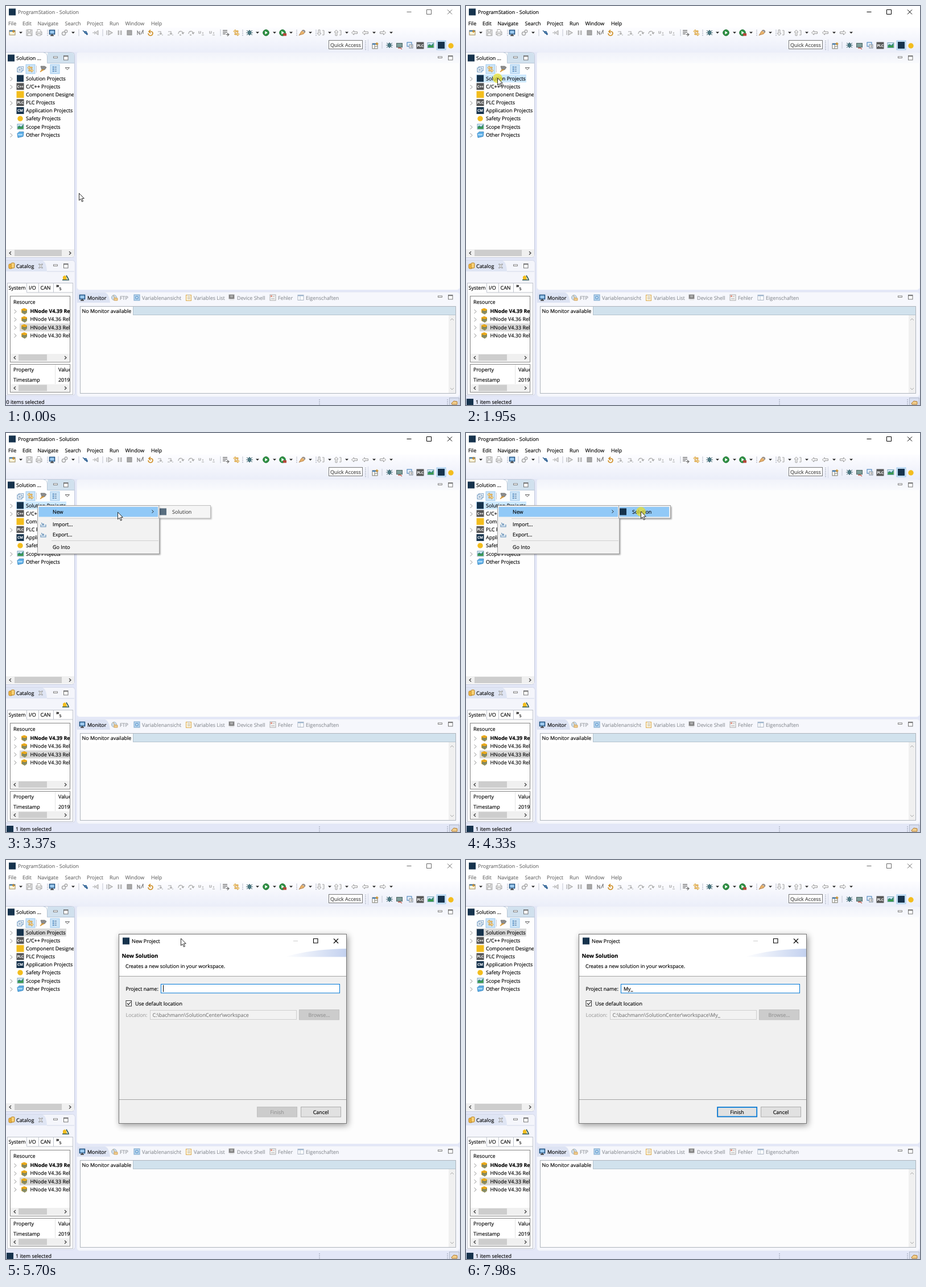
Animation, 798 px wide and 702 px high, one loop 8 s. Source, as an HTML page:

```html
<!DOCTYPE html>
<html lang="en">
<head>
<meta charset="utf-8">
<title>New solution</title>
<style>
html, body { margin: 0; width: 100%; height: 100%; overflow: hidden; background: #e3e7f7; }
svg { display: block; width: 798px; height: 702px; }
text { font: 8.95px "Open Sans", "Noto Sans", sans-serif; text-rendering: geometricPrecision; white-space: pre; stroke-width: .16px; }
</style>
</head>
<body>
<svg id="stage" viewBox="0 0 798 702" xmlns="http://www.w3.org/2000/svg"></svg>
<script>
const NAVY = '#16334d', GOLD = '#f3bd1d', GREY = '#a9a9a9', BLUE = '#3a78b5', ORANGE = '#d08f26', INK = '#000';
const stage = document.getElementById('stage');

// ---- drawing helpers: y of a text is its middle line ----
const rect = (x, y, w, h, fill, stroke = 'none', more = '') =>
  `<rect x="${x}" y="${y}" width="${w}" height="${h}" fill="${fill}" stroke="${stroke}" ${more}/>`;
const path = (d, stroke, fill = 'none', width = 1, more = '') =>
  `<path d="${d}" stroke="${stroke}" fill="${fill}" stroke-width="${width}" ${more}/>`;
const text = (x, y, s, fill = INK, style = '', more = '') =>
  `<text x="${x}" y="${y + 3.2}" fill="${fill}" stroke="${fill}" style="${style}" ${more}>${s}</text>`;
const mid = (x, y, s, fill, style) => text(x, y, s, fill, style, 'text-anchor="middle"');
const group = (id, body) => `<g id="${id}">${body}</g>`;
const at = (x, y, body) => `<g transform="translate(${x} ${y})">${body}</g>`;
const tile = (x, y, label, fill) =>
  rect(x - 6.5, y - 6, 13, 12, fill) + (label ? mid(x, y - 1, label, '#fff', 'font-size:6.2px;font-weight:700') : '');
const logo = (x, y) => rect(x - 6, y - 6, 12, 12, NAVY);
const drop = x => path(`M${x - 3} 45.5h6l-3 3z`, 'none', '#222');
const dots = (x, y, h = 12) => path(`M${x} ${y}v${h}`, '#8f95a8', 'none', 1.3, 'stroke-dasharray="1.3 1.7"');
const bar = (x, y) => path(`M${x} ${y}v12`, '#c3c6d2');
const minMax = (x, y) => rect(x + .5, y - 2, 7, 2.5, '#fff', '#666', 'stroke-width=".8"') +
  rect(x + 18.5, y - 3.5, 7.5, 7.5, '#fff', '#666', 'stroke-width=".9"') + path(`M${x + 18.5} ${y - 2.3}h7.5`, '#666');
const chevron = (x, y) => path(`M${x - 2} ${y - 3}l3.5 3.5l-3.5 3.5`, '#8c8c8c');
const scrollbar = (x, y, w, from, to) => rect(x, y, w, 13, '#f0f0f0') + rect(from, y + 1, to - from, 11, '#cdcdcd') +
  path(`M${x + 9} ${y + 4}l-3 2.7l3 2.7M${x + w - 9} ${y + 4}l3 2.7l-3 2.7`, '#444', 'none', 1.3);

// ---- icons, drawn around 0,0 ----
const icons = {
  window: rect(-5, -4, 10, 8, '#fdf6dc', '#9b8b5c') + path('M-5-3h10', BLUE, 'none', 2) + path('M2-5v5M0-2h5', ORANGE, 'none', 1.5),
  perspective: rect(-5, -4, 9, 9, '#fff', '#7d7a6a') + path('M-5-3h9', BLUE, 'none', 2) + path('M-1-2v7M-1 1h5', '#7d7a6a') + path('M3-6v5M.5-3.5h5', ORANGE, 'none', 1.5),
  save: rect(-5, -5, 10, 10, '#e4e4e4', GREY) + rect(-2.5, -5, 5, 3.5, '#fff', GREY) + rect(-3, 1, 6, 4, '#fff', GREY),
  print: rect(-5, -1.5, 10, 5, '#ddd', GREY) + path('M-3-1.5v-4h5l1 1v3M-3 2h6v3h-6z', GREY, '#fff'),
  screen: rect(-4.5, -4.5, 9, 7, '#9cc9ee', '#1c4f80', 'stroke-width="1.5"') + path('M-3 5h6M0 2v3', '#333', 'none', 1.5),
  gears: '<circle cx="-1.5" cy="1.5" r="3" fill="none" stroke="#aaa" stroke-width="1.6"/><circle cx="2.5" cy="-2.5" r="2.3" fill="none" stroke="#aaa" stroke-width="1.4"/>',
  pin: path('M-4-4L4 4M-2-2l4 0l2 4l-4-1z', '#2d5f91', '#79a9d4', 1.3),
  back: path('M5-4v8l-5-4zM-1-3v6M-5 0h4', GREY, '#ddd'),
  resume: path('M-5-4v8M-2-4v8l7-4z', GREY, '#e2e2e2', 1.2),
  pause: path('M-2.2-4v8M2.2-4v8', '#b5b5b5', 'none', 2.6),
  stop: rect(-4, -4, 8, 8, '#a9a9a9', '#888'),
  link: path('M-5 4v-7l4 6v-6M1 3l4-8v7', '#777', 'none', 1.1),
  sync: path('M-4 1a4 4 0 0 0 8 0a3 3 0 0 0-3-3h-3M0-5l-3 3l3 3', ORANGE, 'none', 1.7),
  into: path('M-4-2h5v4M-1 1l2 2l2-2M-5 4h4M3 4h2', '#aaa', 'none', 1.2),
  over: path('M-4 2a4 4 0 0 1 8-1M2 0l2 2l2-3M-2 4h3', '#aaa', 'none', 1.3),
  out: path('M-4-3v4h3M-1-3l0 4M1 4h4M3-1v3', '#aaa', 'none', 1.2),
  lines: path('M-5-4h8M-5-1h8M-5 2h5M1 3h5M3 1l3 2l-3 3', '#777', 'none', 1.3),
  swap: path('M-5-2.5l3-3v2h5v2h-5v2zM5 2.5l-3 3v-2h-5v-2h5v-2z', ORANGE, '#fbe3a6', .9),
  bug: '<ellipse rx="2.7" ry="3.5" fill="#6a9aa4" stroke="#37606b"/>' + path('M-5-4l3 2M5-4l-3 2M-6 0h12M-5 4l3-2M5 4l-3-2M0-5v10', '#37606b'),
  run: '<circle r="5.3" fill="#2f9244" stroke="#1d7232"/>' + path('M-1.7-3v6l4.6-3z', 'none', '#fff'),
  brush: path('M-5 5l4-7l4-3l3 3l-3 4l-7 2z', '#b9824a', '#e9b46d') + path('M0-4h5v4', '#777', '#b8bcc6'),
  broom: path('M-5-5h7l3 2l-3 4h-5z', '#777', '#8e8e8e') + path('M-3 1l-3 4l7-4z', ORANGE, '#e9b46d'),
  load: path('M-5-5h3v6h2l-3.5 4l-3.5-4h2zM2-4h3v8h-3', '#a5a5a5', '#f1f1f1'),
  unload: path('M-5 5h3v-6h2l-3.5-4l-3.5 4h2zM2-4h3v8h-3', '#a5a5a5', '#f1f1f1'),
  left: path('M-5.5 0l4-4v2.4h6v3.2h-6v2.4z', '#999', '#f6f6f6'),
  right: path('M5.5 0l-4-4v2.4h-6v3.2h6v2.4z', '#999', '#f6f6f6'),
  chart: rect(-5, -4.5, 11, 9, '#d6eaf8', '#7fa6bd') + path('M-4.5 4v-4l3-2l3 2l4-4v8z', 'none', '#3a9a4b') + path('M-4 1l3-2l3 2l3-4', BLUE),
  folder: path('M-5-2l3-3h8l-1 8l-9 2z', '#3d8ac4', '#62b1e8') + path('M-4 0h8', '#d4efff', 'none', 1.5),
  list: path('M-1-3.5h4M-1 0h4M-1 3.5h4', '#4d6f96', 'none', 1.2) + path('M-4-3.5h2M-4 0h2M-4 3.5h2', BLUE, 'none', 2),
  collapse: rect(-2.5, -4.5, 8, 7, '#fff', '#86a6c7') + rect(-5, -2, 8, 7, '#fff', '#5586b5') + path('M-3 1.5h4', '#2d5f91', 'none', 1.2),
  books: path('M-5-3.5l5-2l5 2v6l-4 3l-6-3z', 'none', '#e9a91c') + path('M-4-1.5l5 2l4-2v4l-4 3l-5-2.5z', 'none', '#35617a') +
    path('M-4 0l5 2.2l4-2M-4 2.3l5 2l4-2.3', '#f0c650', 'none', .9),
  jars: rect(-5, -3, 6, 8, '#f1b844', '#b57b16', 'rx="1.5"') + rect(-1, -5, 6, 9, '#f8d278', '#b57b16', 'rx="1.5"'),
  globe: '<circle cx="-1" r="4.5" fill="#cfdde9" stroke="#9db3c6"/>' + path('M-1 1h6v4h-6zM-3-4l4 5', '#d1a155', '#f2cf93'),
  vars: rect(-5, -5, 10, 10, '#b6d4ee', '#7ba5cb') + '<circle r="2.7" fill="#4d8dc6"/>' + path('M-1-1h2v2h-2z', '#fff'),
  clip: rect(-4.5, -4.5, 9, 10, '#fff4d8', '#dbab53') + path('M-2-4.5h4M-2-1h5M-2 2h5', '#a6a6a6', 'none', 1.2),
  shell: rect(-5, -5, 9, 7, '#777', '#999') + path('M-3-3h5M-3-1h5M-4 4h8', '#ddd'),
  error: rect(-5, -5, 10, 10, '#f5f5f5', '#aaa') + path('M-3 2h6M0-2h3', '#aaa') + rect(-4, -4, 3, 3, '#e59a8b'),
  table: rect(-5, -4.5, 10, 9, '#fff', '#a9b4c2') + path('M-5-3.5h10', '#9db6d1', 'none', 2) + path('M-1-3v7', '#b9c4d1'),
  pages: rect(-5, -5, 8, 7, '#e6f0fa', BLUE) + rect(-1, -1, 6, 6, '#fff', '#7b8796') + path('M1 1h3M1 3h3', '#777'),
  debug: rect(-5.5, -4.5, 10, 7, '#7d9e9a', '#4f6462') + path('M0 3l4 3M-3 4h4', '#c25a4a', 'none', 1.5),
  tray: path('M-5 0v4h9v-4M-4-3l4 4M0-2v3h-3', '#6c95bb', '#d9e5f0', 1.2)
};
const icon = (name, x, y = 47) => at(x, y, icons[name]);
const safety = (x, y) => `<circle cx="${x}" cy="${y}" r="4.7" fill="${GOLD}"/>`;

// ---- fixed parts of the window ----
const lit = (x, y) => rect(x - 8, y - 8, 16, 16, '#cce4f7', '#90c0ea', 'stroke-width=".8"');

function topBars() {
  const words = [['File', 4], ['Edit', 29], ['Navigate', 55.5], ['Search', 103.5], ['Project', 142], ['Run', 182], ['Window', 209.5], ['Help', 255]];
  const tools = [['window', 11], ['save', 41], ['print', 58], ['screen', 81], ['gears', 103], ['pin', 139], ['back', 157], ['resume', 182],
    ['pause', 200], ['stop', 217], ['link', 236], ['sync', 254], ['into', 271], ['into', 289], ['over', 307], ['over', 325], ['out', 343],
    ['out', 362], ['lines', 386], ['swap', 405], ['bug', 428], ['run', 457], ['run', 486], ['brush', 520], ['load', 554], ['unload', 584],
    ['left', 613], ['left', 632], ['right', 662]];
  return rect(0, 0, 798, 702, '#e3e7f7') + rect(0, 0, 798, 38, '#fff') + rect(0, 38, 798, 43, 'url(#tools)') + logo(11, 10.5) +
    group('caption', text(21, 10.7, 'ProgramStation - Solution') + words.map(([w, x]) => text(x, 30.7, w)).join('') +
      path('M704.5 10.5h8M739.5 6.5h8v8h-8zM776 6.5l8 8m0-8l-8 8', INK)) +
    tools.map(([n, x]) => icon(n, x)).join('') + rect(487, 48, 6, 4.5, '#b4473a') +
    [26, 118, 442, 472, 501, 535, 569, 599, 647, 677].map(drop).join('') +
    [73, 416, 511, 545].map(x => dots(x, 42)).join('') + [92, 128, 170, 377].map(x => bar(x, 41)).join('') +
    rect(567.5, 60.5, 59, 15, '#fff', '#777') + text(570, 68.5, 'Quick Access', '#444') + dots(632, 61, 17) + path('M636.5 59v20', '#d5d9e8') + bar(661, 63) +
    icon('perspective', 649, 70) + icon('bug', 674, 69) + icon('debug', 692, 70) + icon('pages', 710, 69) + tile(728, 69.5, 'PLC', '#575757') +
    icon('chart', 746, 69) + lit(765, 69) + logo(765, 69) + safety(782, 70);
}

const editor = () => rect(124.5, 81.5, 673, 418, '#fdfdfd', '#eceef8', 'rx="5"') + rect(125, 82, 673, 18.5, 'url(#head)') + minMax(759, 91);

const rowY = i => 127.4 + i * 14.15;
const rows = [
  ['Solution Projects', logo, 1], ['C/C++ Projects', (x, y) => tile(x, y, 'C++', '#575757'), 1],
  ['Component Designer', (x, y) => tile(x, y, '', GOLD)], ['PLC Projects', (x, y) => tile(x, y, 'PLC', '#575757'), 1],
  ['Application Projects', (x, y) => tile(x, y, 'CM', NAVY)], ['Safety Projects', safety],
  ['Scope Projects', (x, y) => icon('chart', x, y), 1], ['Other Projects', (x, y) => icon('folder', x, y), 1]
];
const rowEnds = [106, 101, 119, 88, 119, 97, 97, 96];

function projects() {
  const list = rows.map(([name, mark, nested], i) => {
    const y = rowY(i);
    return (nested ? chevron(9.5, y + .5) : '') + mark(25, y) + text(35, y, name);
  }).join('');
  return rect(-4, 81.5, 124.5, 361, '#fefefe', '#c5cbdc', 'rx="5"') + path('M73 82H115q5 0 5 5v13.5H73z', 'none', '#d1e1ee') +
    path('M66 82q6 0 6.5 7v11.5H120', '#b7c7d8') + logo(9, 91.5) + text(18, 91.7, 'Solution ...') + minMax(83, 91) +
    icon('collapse', 25, 111) + lit(43, 111) + icon('swap', 43, 111) + bar(53.5, 105) + icon('broom', 66, 111) + lit(86, 111) + icon('list', 86, 111) +
    path('M104 108.5h7.5l-3.7 3.7z', '#555', '#fff', .9) +
    group('rowHint', rect(0, 0, 1, 1, '#e5f3ff')) + `<g clip-path="url(#tree)">${list}</g>` + scrollbar(0, 428, 120, 15, 98);
}

function catalog() {
  const versions = [39, 36, 33, 30].map((v, i) => {
    const y = 537 + i * 14.15;
    return chevron(16.5, y) + icon('books', 32, y) + text(42.5, y, `HNode V4.${v} Release`, INK, i ? '' : 'font-weight:700');
  }).join('');
  return rect(-4, 447.5, 125.5, 238, '#f4f5fb', '#d3d8e8', 'rx="5"') + path('M0 467V448H64q7 2 8 19z', 'none', '#dfe5f4') + path('M72 467h48', '#d3d8e8') +
    icon('jars', 10, 457) + text(18, 457.5, 'Catalog') + minMax(83, 457) +
    path('M57.5 454h2l1.5 2l1.5-2h2l-2.5 3.5l2.5 3.5h-2l-1.5-2l-1.5 2h-2l2.5-3.5z', '#777', '#fff', .8) +
    path('M100 482v-6l3-2l3 2l1 6z', 'none', GOLD) + path('M99 482h12M106 474l4 7', '#2f5a52', 'none', 1.6) +
    rect(2.5, 487.5, 115, 196, '#fff', '#bfc3cc') + rect(3, 504, 114, 179, '#fafafa') + path('M36.5 488v16M57.5 488v16M83.5 488v16M36.5 504H117', '#bfc3cc') +
    text(4.5, 496, 'System') + text(40, 496, 'I/O') + text(60.5, 496, 'CAN') + text(88, 492, '»', INK, 'font-weight:700') + text(93.5, 497, '5', INK, 'font-size:7px') +
    rect(7.5, 510.5, 105, 116, '#fff', '#888') + rect(7.5, 630.5, 105, 49, '#fff', '#888') + text(13, 520.5, 'Resource') +
    `<g clip-path="url(#list)">${rect(24, 558.5, 90, 14, '#d9d9d9')}${versions}` +
    text(13, 640, 'Property') + text(92, 640, 'Value') + text(13, 657.5, 'Timestamp') + text(92, 657.5, '2019-06-12') + '</g>' +
    path('M86.5 631v34', '#e2e2e2') + scrollbar(8, 612, 104, 22, 72) + scrollbar(8, 665.5, 104, 22, 72);
}

function monitor() {
  const tabs = [['screen', 134, 'Monitor'], ['globe', 191, 'FTP'], ['vars', 230, 'Variablenansicht'], ['clip', 321, 'Variables List'],
    ['shell', 397, 'Device Shell'], ['error', 469, 'Fehler'], ['table', 518, 'Eigenschaften']];
  return rect(124.5, 503.5, 673, 184, '#f6f7fc', '#e8ebf6', 'rx="5"') + path('M125 522V508q0-4 4-4H174q7 2 9 18z', 'none', '#dde3f3') +
    tabs.map(([n, x, w], i) => icon(n, x, 513) + text(x + 9, 513.5, w, i ? '#8f9399' : INK)).join('') + minMax(759, 512) +
    rect(130.5, 528.5, 660, 153, '#fdfdfd', '#aeb4bc') + rect(223, 529, 567, 15, '#d1e2ed') + path('M131 543.5H790M223.5 529v14', '#b4c3ce') +
    rect(131, 529, 92, 15.5, '#fff') + text(133.5, 537, 'No Monitor available') + rect(778, 544, 12, 137, '#f0f0f0') +
    path('M781 553l3-3l3 3M781 672l3 3l3-3', '#aaa');
}

const statusLine = () => group('none', text(.5, 696.5, '0 items selected')) + group('one', logo(7, 697) + text(17, 697, '1 item selected')) +
  dots(551, 692, 10) + dots(776, 692, 10) + rect(779.5, 689.5, 17, 14, '#d9dff0', '#b3bacb') + path('M783 699l4-4l6 1v5h-9z', '#b07a31', '#f1cd8a');

// ---- menus and dialog ----
const popup = (x, y, w, h) => rect(x + 2, y + 2, w, h, INK, 'none', 'opacity=".35" filter="url(#soft)"') + rect(x, y, w, h, '#f2f2f2', '#a3a3a3');

function menus() {
  const main = popup(55.5, 127.5, 214, 85) + rect(57.5, 130, 209.5, 17.5, '#91c9f7', 'none', 'id="newItem"') + text(82, 138.5, 'New') +
    path('M256.5 135.5l2.7 2.7l-2.7 2.7', '#222') + text(82, 161, 'Import...') + text(82, 178.5, 'Export...') + text(82, 201, 'Go Into') +
    path('M80 150.5h188M80 189.5h188', '#cfcfcf') + icon('tray', 66, 161) + icon('tray', 66, 179);
  const sub = popup(268.5, 127.5, 91, 22.5) + rect(270, 130, 87, 17.5, '#91c9f7', 'none', 'id="subItem"') + logo(276, 138.5) + text(292, 138.5, 'Solution');
  return group('menu', main) + group('sub', sub);
}

function dialog() {
  const button = (x, y, label, fill, edge, ink) => rect(x, y, 70, 17.5, fill, edge) + mid(x + 35, y + 9, label, ink);
  const disabled = ['#ccc', '#c0c0c0', '#959595'];
  return rect(200, 133, 401, 334, INK, 'none', 'opacity=".4" filter="url(#shade)"') + rect(198.5, 130.5, 400, 333, '#f0f0f0', '#777') +
    rect(199, 131, 399, 73, '#fff') + path('M490 170.5Q535 157 598 156v14.5z', 'none', 'url(#wave)') + path('M199 204.5h399M199 421.5h399', '#a3a3a3') +
    logo(211, 142.5) + text(221, 142.8, 'New Project') + path('M505 142.5h8', '#ccc') + path('M540.5 138.5h7.5v7.5h-7.5zM576 138.5l8 8m0-8l-8 8', INK, 'none', 1.1) +
    text(203.5, 168.5, 'New Solution', INK, 'font-weight:700;font-size:9.6px') + text(210, 187, 'Creates a new solution in your workspace.') +
    text(210.5, 226.5, 'Project name:') + rect(272.5, 218.5, 314, 15.5, '#fff', '#0078d7') +
    text(277, 226.3, '', INK, '', 'id="name"') + path('M0 220v12', INK, 'none', 1, 'id="caret"') +
    rect(211, 247.5, 9.5, 9.5, '#fff', '#333') + path('M213 252l2.3 2.5l4-5', '#222', 'none', 1.2) + text(227, 252.5, 'Use default location') +
    text(210.5, 272.5, 'Location:', '#a3a3a3') + rect(253.5, 264.5, 257, 16, '#f2f2f2', '#cfcfcf') + text(257.5, 272.5, '', '#7d7d7d', '', 'id="place"') +
    button(515.5, 263.5, 'Browse...', ...disabled) + button(518.5, 434.5, 'Cancel', '#e1e1e1', '#adadad', INK) + button(441.5, 434.5, 'Finish', ...disabled) +
    group('ready', rect(442.2, 435, 69, 16.5, '#e1e1e1', '#0078d7', 'stroke-width="1.7"') + mid(476.5, 443.5, 'Finish', INK));
}

const fade = (id, stops, dir = 'x2="0" y2="1"') => `<linearGradient id="${id}" x1="0" y1="0" ${dir}>` +
  stops.map((c, i) => `<stop offset="${i}" stop-color="${c}"/>`).join('') + '</linearGradient>';
const blur = (id, d) => `<filter id="${id}" x="-10%" y="-10%" width="120%" height="125%"><feGaussianBlur stdDeviation="${d}"/></filter>`;
stage.innerHTML = '<defs>' + fade('tools', ['#fdfdff', '#ebeef9']) + fade('head', ['#f1f3fa', '#f9fafd']) +
  fade('wave', ['#ffffff', '#c3d1ef'], 'x2="1" y2="0"') + blur('soft', 1.2) + blur('shade', 6) +
  '<clipPath id="tree"><rect y="101" width="119" height="326"/></clipPath><clipPath id="list"><rect x="8" y="511" width="104" height="168"/></clipPath></defs>' +
  topBars() + editor() + projects() + catalog() + monitor() + statusLine() + group('dialog', dialog()) + menus() +
  group('ghost', rect(269, 130, 87, 17, '#b5daf8') + logo(276, 138.5) + text(292, 138.5, 'Solution', '#444')) +
  group('halo', '<circle r="8.5" fill="#e9df28" opacity=".72"/>') +
  group('cursor', path('M0 0V12.5L2.9 9.9L5 14.8L7 13.9L4.9 9.1H8.8Z', '#111', '#fff', .9));

// ---- motion ----
const parts = Object.fromEntries([...stage.querySelectorAll('[id]')].map(e => [e.id, e]));
const show = (id, amount) => parts[id].setAttribute('opacity', +amount);
const place = (id, x, y) => parts[id].setAttribute('transform', `translate(${x} ${y})`);
const within = (t, a, b) => t >= a && t < b;
const passed = (t, times) => times.filter(a => t >= a).length;
// share of a stepped move done at t; the first of n steps falls at start
const step = (t, start, gap, n) => Math.max(0, Math.min(1, (Math.floor((t - start) / gap + .15) + 1) / n));

const smooth = u => u * u * (3 - 2 * u);
const slowing = u => 1 - (1 - u) ** 1.3;
const linear = u => u;
// start, gap, steps, end x, end y, easing
const moves = [
  [70, 78.75, 9, 41, 116, smooth], [950, 80, 2, 49.5, 120.5, linear], [1180, 75, 3, 55.5, 126.8, linear],
  [2590, 80, 8, 144, 140, smooth], [3220, 79, 11, 299, 138, slowing], [4080, 80, 2, 307.5, 138, linear]
];
function pointer(t) {
  let x = 128.5, y = 329.5;
  for (const [start, gap, n, ex, ey, ease] of moves) {
    const u = ease(step(t, start, gap, n));
    x += (ex - x) * u;
    y += (ey - y) * u;
  }
  return [x, y];
}

function markRow(x, y, picked, open) {
  const i = picked ? 0 : Math.floor((y - 120.3) / 14.15);
  const on = picked || (i >= 0 && i < rows.length && x > 17 && x < rowEnds[i]);
  show('rowHint', on);
  if (!on) return;
  const fill = !picked ? '#e5f3ff' : open ? '#d9d9d9' : '#cce8ff';
  const box = { x: 17.5, y: rowY(i) - 6.8, width: rowEnds[i] - 17.5, height: 13.8, fill };
  for (const k in box) parts.rowHint.firstChild.setAttribute(k, box[k]);
}

function render(t) {
  const [x, y] = pointer(t);
  const picked = t >= 1950, open = t >= 4490, menuOn = within(t, 2350, 4410);
  show('caption', picked && !open ? 1 : .58);
  show('none', !picked);
  show('one', picked);
  markRow(x, y, picked, open);

  show('menu', menuOn && step(t, 2350, 80, 3));
  show('newItem', y > 130);
  show('sub', menuOn && step(t, 3300, 79, 4) ** .5);
  show('subItem', x > 269);
  show('ghost', within(t, 4410, 4650) && 1 - step(t, 4410, 80, 5));

  const p = step(t, 4490, 78, 4);
  show('dialog', 1 - (1 - p) ** 1.5);
  parts.dialog.setAttribute('transform', `translate(398.5 297) scale(${.965 + .035 * p}) translate(-398.5 -297)`);

  const name = 'My_';
  const typed = passed(t, [6260, 6750, 7380]), placed = passed(t, [6340, 6830, 7450]);
  parts.name.textContent = name.slice(0, typed);
  parts.place.textContent = 'C:\\bachmann\\SolutionCenter\\workspace' + (placed ? '\\' + name.slice(0, placed) : '');
  place('caret', [276.5, 285, 289.5, 294.5][typed], 0);
  show('caret', !(within(t, 5220, 5700) || within(t, 6180, 6260) || t >= 7980));
  show('ready', step(t, 6340, 80, 4));

  show('halo', within(t, 1950, 2050) || within(t, 4330, 4410));
  place('halo', x, y + .5);
  show('cursor', t < 6260);
  place('cursor', x, y);
}

function tick() {
  render(performance.now() % 8000);
  requestAnimationFrame(tick);
}
tick();
</script>
</body>
</html>
```
